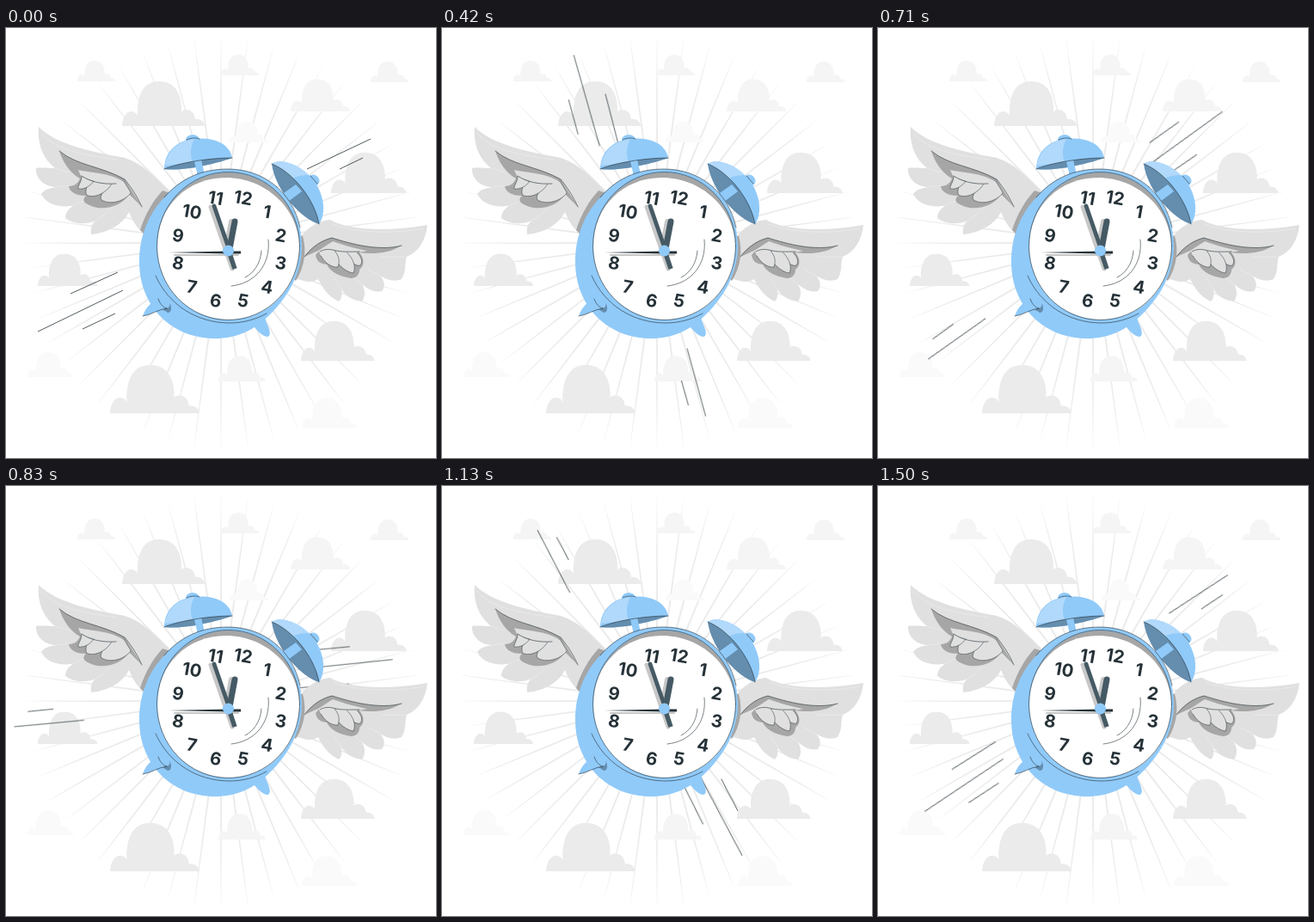
Animation, 500 px wide and 500 px high, one loop 1540 ms. Source, as an HTML page:

```html
<!DOCTYPE html>
<html lang="en">
<head>
<meta charset="utf-8">
<title>Flying alarm clock</title>
<style>
  html, body { margin: 0; width: 100%; height: 100%; overflow: hidden; background: #fff; }
  svg { display: block; width: 100vw; height: 100vh; }
  .blue { fill: #90caf9; }
  .pale { fill: #b1d9fb; }
  .deep { fill: #648dae; }
  .wing { fill: #e0e0e0; }
  .shade { fill: #a6a6a6; }
  .ink { fill: none; stroke: #263238; stroke-width: .6; stroke-linecap: round; stroke-linejoin: round; }
  .edge { stroke: #263238; stroke-width: .5; stroke-linejoin: round; }
  .hair { fill: none; stroke: #ededed; stroke-width: .7; }
  .near { fill: #ebebeb; }
  .mid { fill: #f5f5f5; }
  .far { fill: #fafafa; }
  #digits { font: 700 20.5px Inter, "Open Sans", sans-serif; fill: #263238; text-anchor: middle; }
  #speed { fill: none; stroke: #263238; stroke-width: .8; transform-origin: 230px 241px; animation: whirl 1540ms infinite; }
  /* 24 steps a second, slowing a little towards the end of the turn */
  @keyframes whirl {
    0% { transform: rotate(0deg); animation-timing-function: steps(20); }
    53.7% { transform: rotate(200deg); animation-timing-function: steps(7); }
    73.2% { transform: rotate(267.9deg); animation-timing-function: steps(9); }
    97.27% { transform: rotate(352.1deg); animation-timing-function: step-end; }
    100% { transform: rotate(360deg); }
  }
</style>
</head>
<body>
<svg viewBox="0 0 500 500">
  <defs>
    <path id="cloud" d="M0 0C0-9 5-17 10-17C14-17 17-15 18-12C17-33 23-52 43-52C62-52 70-36 69-17C73-21 84-20 85-8C91-9 96-5 96 0Z"/>
  </defs>

  <g id="rays" fill="#ebebeb"></g>

  <g class="near">
    <use href="#cloud" transform="translate(135 114)"/>
    <use href="#cloud" transform="translate(378 192) scale(.91)"/>
    <use href="#cloud" transform="translate(37 300) scale(.72)"/>
    <use href="#cloud" transform="translate(121 448) scale(1.08)"/>
    <use href="#cloud" transform="translate(343 387) scale(.89)"/>
  </g>
  <g class="mid">
    <use href="#cloud" transform="translate(83 62) scale(.46)"/>
    <use href="#cloud" transform="translate(250 55) scale(.46)"/>
    <use href="#cloud" transform="translate(331 97) scale(.72)"/>
    <use href="#cloud" transform="translate(424 63) scale(.46)"/>
    <use href="#cloud" transform="translate(247 411) scale(.57)"/>
  </g>
  <g class="far">
    <use href="#cloud" transform="translate(260 133) scale(.47)"/>
    <use href="#cloud" transform="translate(25 406) scale(.56)"/>
    <use href="#cloud" transform="translate(344 465) scale(.67)"/>
  </g>

  <path id="speed" d="M350 164L424 129M388 164L415 151M37 353L136 305M75 309L130 284M89 350L127 332"/>

  <g id="left-wing">
    <path class="wing" d="M38 115C58 136 105 145 138 151C160 158 174 174 190 190L161 240C153 234 147 224 143 214C136 228 120 238 99 240C98 232 100 228 104 224C92 230 76 227 69 221C69 214 74 209 79 206C66 210 47 206 41 193C45 187 53 186 59 185C46 185 34 176 35 163C40 162 50 163 57 163C43 152 36 135 38 115Z"/>
    <path class="hair" d="M41 122C53 140 90 148 130 153M57 163L74 168M59 185L73 183M79 206L91 201M104 224C113 219 118 214 122 210"/>
    <path class="shade" d="M62 143C82 160 112 161 138 176L158 208L143 193C136 207 112 214 97 206C89 203 89 199 93 195C80 195 74 190 73 184C80 184 84 180 86 175C75 169 66 156 62 143Z"/>
    <path class="wing edge" d="M120 181C114 188 108 196 111 200C121 206 137 202 145 192L137 178Z"/>
    <path class="wing edge" d="M98 176C93 184 91 193 95 195C106 198 118 190 123 181Z"/>
    <path class="wing edge" d="M88 172C88 179 83 184 84 187C91 188 98 184 102 178Z"/>
    <path class="wing" d="M84 165C100 169 121 168 137 179L145 192L133 182C118 182 101 179 87 172Z"/>
    <path class="ink" d="M62 143C82 160 112 161 138 176C147 187 153 197 158 208M88 172C98 179 112 182 128 181"/>
    <path class="shade" d="M182 189L197 194C181 206 171 224 167 246L156 235C162 216 171 201 182 189Z"/>
  </g>

  <g id="right-wing">
    <path class="wing" d="M336 252C348 232 363 224 377 223C395 234 440 238 490 229C488 247 480 260 466 266C463 275 466 282 460 292C451 296 441 292 435 288C441 295 441 301 437 306C428 308 420 303 414 298C418 305 418 312 414 318C402 317 394 310 390 304C391 310 390 315 387 318C374 312 368 302 363 292C355 297 348 295 336 291Z"/>
    <path class="hair" d="M380 228C405 238 450 240 486 233M466 266L436 266M435 288L420 280M414 298L401 288M390 304L382 291"/>
    <path class="shade" d="M347 266C356 254 367 247 379 244C401 251 434 260 460 253C444 263 425 263 411 261C417 269 417 276 411 281C411 287 407 291 401 291C389 289 377 284 373 275C364 274 361 270 360 264L365 258Z"/>
    <path class="wing edge" d="M394 258C397 268 405 278 412 276C416 271 412 264 406 259Z"/>
    <path class="wing edge" d="M378 260C382 272 394 284 404 285C408 276 402 265 393 258Z"/>
    <path class="wing edge" d="M364 260C367 270 377 279 386 278C389 269 386 263 380 257Z"/>
    <path class="wing" d="M363 259L380 248C393 253 410 257 420 259C408 262 392 262 381 259L366 265Z"/>
    <path class="ink" d="M347 266C356 254 367 247 379 244C401 251 434 260 460 253M365 260C370 257 375 257 380 258C390 261 401 260 411 260"/>
    <path class="shade" d="M339 241L345 242C350 260 347 278 337 294L331 289C340 273 342 258 339 241Z"/>
  </g>

  <g id="bells">
    <path class="blue" d="M219 152L227 150L231 172L223 174Z"/>
    <ellipse class="blue" cx="217" cy="130" rx="8" ry="6"/>
    <path class="blue" d="M184 164C184 146 196 132 217 129C241 126 260 134 263 151C244 158 205 167 184 164Z"/>
    <path class="pale" d="M185 160C187 145 198 132 219 129C214 138 214 148 217 156Z"/>
    <path class="deep" d="M184 164C200 157 236 151 263 151C244 158 205 167 184 164Z"/>
    <path class="blue" d="M219 155L227 153L229 162L221 164Z"/>
    <path class="ink" d="M184 164C200 157 236 151 263 151M210 130C214 128 221 127 225 129"/>
    <ellipse class="blue" cx="358" cy="177" rx="6" ry="7" transform="rotate(-40 358 177)"/>
    <path class="blue" d="M309 158C318 151 340 158 355 174C370 191 373 215 364 228C344 219 316 188 309 158Z"/>
    <path class="pale" d="M309 158C318 151 340 158 352 171C343 171 335 173 331 177Z"/>
    <path class="deep" d="M309 158C333 167 359 199 364 228C344 223 313 189 309 158Z"/>
    <path class="blue" d="M320 194L337 182L344 190L328 202Z"/>
    <path class="ink" d="M309 158C333 167 359 199 364 228M354 172L362 181"/>
  </g>

  <g id="clock">
    <path class="blue" d="M286 344L300 335C303 344 309 353 306 358C301 362 292 352 286 344Z"/>
    <path class="blue" d="M258 164C309 164 344 204 344 253C344 283 330 311 306 334C290 351 268 361 243 361C193 361 155 324 155 272C155 243 165 217 184 197C202 176 226 164 258 164Z"/>
    <ellipse class="shade" cx="258.5" cy="253.5" rx="82.5" ry="85.5"/>
    <path fill="#fff" d="M176 254C176 207 211 174 256 174C300 174 340 208 341 254C341 302 305 339 259 339C214 339 176 303 176 254Z"/>
    <ellipse class="ink" cx="258.5" cy="253.5" rx="83" ry="86"/>
    <path class="ink" d="M184 197C202 176 226 164 258 164C299 164 333 190 342 232M174 288C189 322 222 343 260 343C276 343 290 339 303 332"/>
    <path class="deep" d="M185 314L191 321C193 326 192 331 188 331L179 325Z"/>
    <path class="blue" d="M159 335C162 325 170 318 176 315C179 309 187 310 188 315C192 320 191 325 187 326C177 327 168 334 159 335Z"/>
    <path class="ink" d="M159 335C168 334 177 327 187 326M177 315C179 321 183 325 187 326"/>
    <g id="digits"></g>
    <path class="ink" d="M305 246C308 275 290 297 262 300M297 259C296 274 288 285 278 290"/>
    <g fill="none" stroke="#c7c7c7" stroke-linecap="round">
      <path stroke-width="6" d="M262 225L255 261"/>
      <path stroke-width="5" d="M238 208L263 280"/>
      <path stroke-width="2" d="M196 264L270 264"/>
    </g>
    <g fill="none" stroke="#455a64">
      <path stroke-width="7" stroke-linecap="round" d="M266 225L259 262"/>
      <path stroke-width="5.5" d="M259 259L266 280"/>
      <path stroke-width="4.8" stroke-linecap="round" d="M242 207L260 259"/>
    </g>
    <path fill="#263238" d="M189 261L258 259.5L273 259.5L273 262.5L258 262.5Z"/>
    <circle class="blue" cx="258.5" cy="259" r="6.5"/>
  </g>
</svg>
<script>
  const fill = (id, count, draw) => {
    document.getElementById(id).innerHTML = Array.from({ length: count }, (_, i) => draw(i)).join('');
  };

  // Evenly spread needles, slightly longer towards the sides
  const rayCount = 48;
  fill('rays', rayCount, i => {
    const turn = i * 360 / rayCount;
    const len = 237 - 5 * Math.cos(turn * Math.PI / 90);
    const bend = len * .75;
    return `<path transform="translate(250 250) rotate(${turn})" d="M0-1.1Q${bend}-1.1 ${len} 0Q${bend} 1.1 0 1.1Z"/>`;
  });

  // The dial is tilted: twelve sits 15 degrees past the top
  fill('digits', 12, i => {
    const a = ((i + 1) * 30 + 15) * Math.PI / 180;
    const x = 259.8 + 61.8 * Math.sin(a), y = 257.3 - 61.8 * Math.cos(a);
    return `<text transform="translate(${x} ${y}) rotate(10)" y="7.2">${i + 1}</text>`;
  });
</script>
</body>
</html>
```
